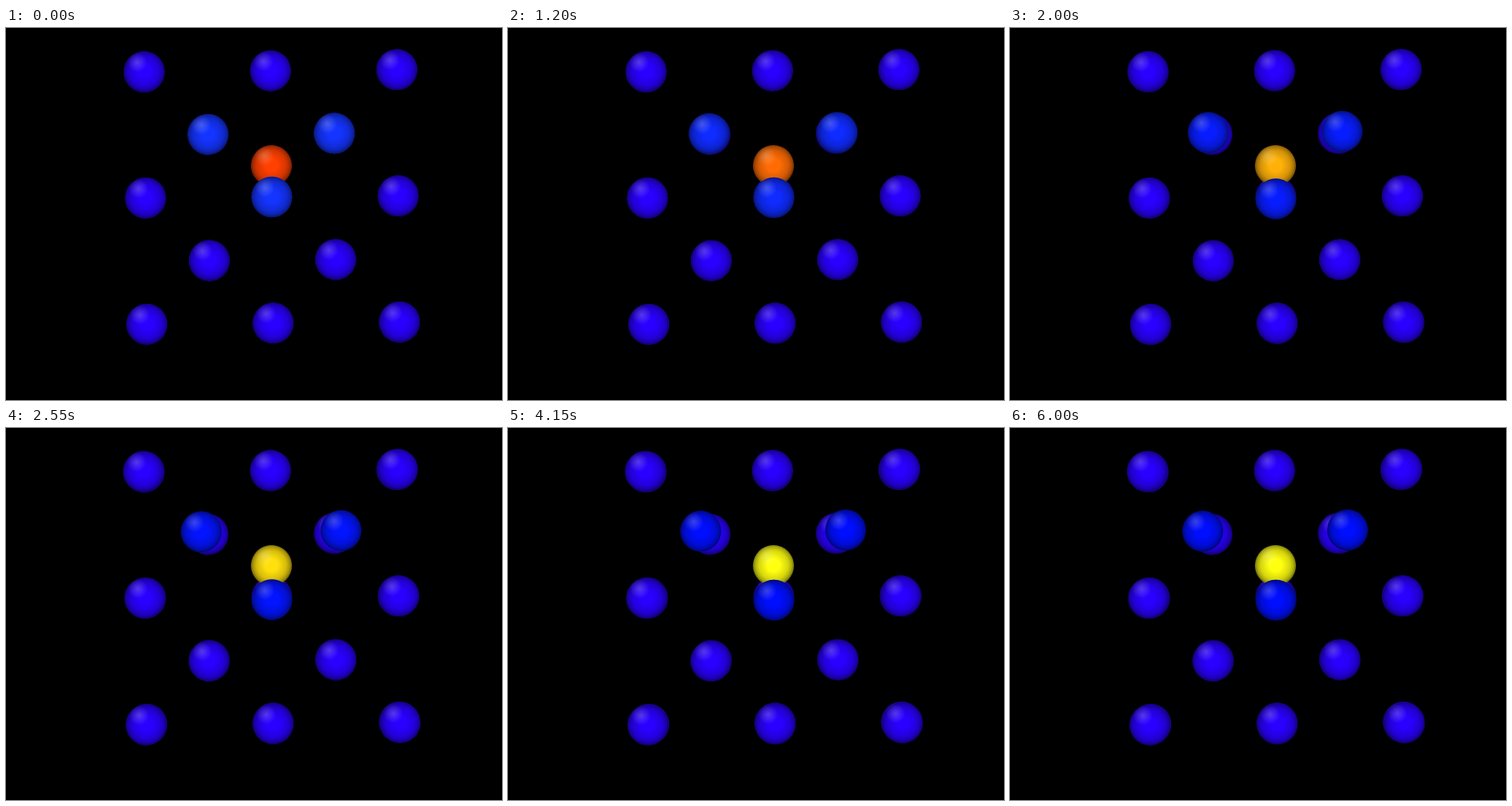
These frames come from a looping animation (640 px wide and 480 px high, 6.05 s). An HTML page:

```html
<!DOCTYPE html>
<html lang="en">
<head>
<meta charset="utf-8">
<title>Lattice relaxation</title>
<style>
  html, body { margin: 0; width: 100%; height: 100%; overflow: hidden; background: #000; }
  svg { display: block; width: 640px; height: 480px; }
</style>
</head>
<body>
<svg id="stage" viewBox="0 0 640 480" xmlns="http://www.w3.org/2000/svg">
  <defs>
    <radialGradient id="shade" cx=".5" cy=".49" r=".51">
      <stop offset=".3" stop-color="#000" stop-opacity="0"/>
      <stop offset=".7" stop-color="#000" stop-opacity=".16"/>
      <stop offset=".88" stop-color="#000" stop-opacity=".34"/>
      <stop offset="1" stop-color="#000" stop-opacity=".6"/>
    </radialGradient>
    <radialGradient id="shine" cx=".33" cy=".27" r=".24">
      <stop offset="0" stop-color="#fff" stop-opacity=".22"/>
      <stop offset="1" stop-color="#fff" stop-opacity="0"/>
    </radialGradient>
  </defs>
</svg>
<script>
const LOOP = 6050, STEP = 50, SETTLE = 3300, RADIUS = 26.3;
const CENTER = { x: 342.5, y: 177.5 };
const VIOLET = "rgb(42,0,255)";

const stage = document.getElementById("stage");

function add(parent, tag, attrs = {}) {
  const node = document.createElementNS("http://www.w3.org/2000/svg", tag);
  for (const name in attrs) node.setAttribute(name, attrs[name]);
  return parent.appendChild(node);
}

function addBall({ x, y }, fill) {
  const group = add(stage, "g", { transform: `translate(${x} ${y})` });
  const body = add(group, "circle", { r: RADIUS, fill });
  add(group, "circle", { r: RADIUS, fill: "url(#shade)" });
  add(group, "circle", { r: RADIUS, fill: "url(#shine)" });
  return { group, body };
}

// A slightly turned, centred square lattice.
const sites = [];
for (let row = 0; row < 5; row++) {
  for (let col = row % 2; col < 5; col += 2) {
    const x = 178.3 + 81.5 * col + 0.85 * row;
    const y = 56.6 - 0.7 * col + 81.4 * row;
    const near = Math.hypot(x - CENTER.x, y - CENTER.y) < 100;
    sites.push({ x, y, near });
  }
}
// The atom straight above the impurity belongs to the outer shell.
const isNeighbor = site => site.near && site.y > 100;

sites.forEach(site => addBall(site, VIOLET));
const impurity = addBall(CENTER, VIOLET);
const movers = sites.map(site => ({ ...site, ...addBall(site, VIOLET) }));

const smooth = u => u * u * (3 - 2 * u);

function draw(time) {
  let t = Math.floor(time % LOOP / STEP) * STEP;
  if (t < 2 * STEP) t = 0;
  const u = Math.min(1, t / SETTLE);
  const spread = smooth(u ** 1.65), lift = smooth(u ** 1.15);

  impurity.body.setAttribute("fill", `rgb(255,${64 + 191 * lift},${16 * lift})`);
  const blue = `rgb(${20 * (1 - lift)},${52 - 38 * lift},255)`;

  // Every atom is pushed away from the impurity, the nearest ones most.
  for (const atom of movers) {
    const push = isNeighbor(atom) ? 1 : 0.05;
    const x = atom.x + 0.147 * push * spread * (atom.x - CENTER.x);
    const y = atom.y + 0.103 * push * lift * (atom.y - CENTER.y);
    atom.group.setAttribute("transform", `translate(${x} ${y})`);
    if (isNeighbor(atom)) atom.body.setAttribute("fill", blue);
  }
}

const began = performance.now();
function tick() {
  draw(performance.now() - began);
  requestAnimationFrame(tick);
}
tick();
</script>
</body>
</html>
```
